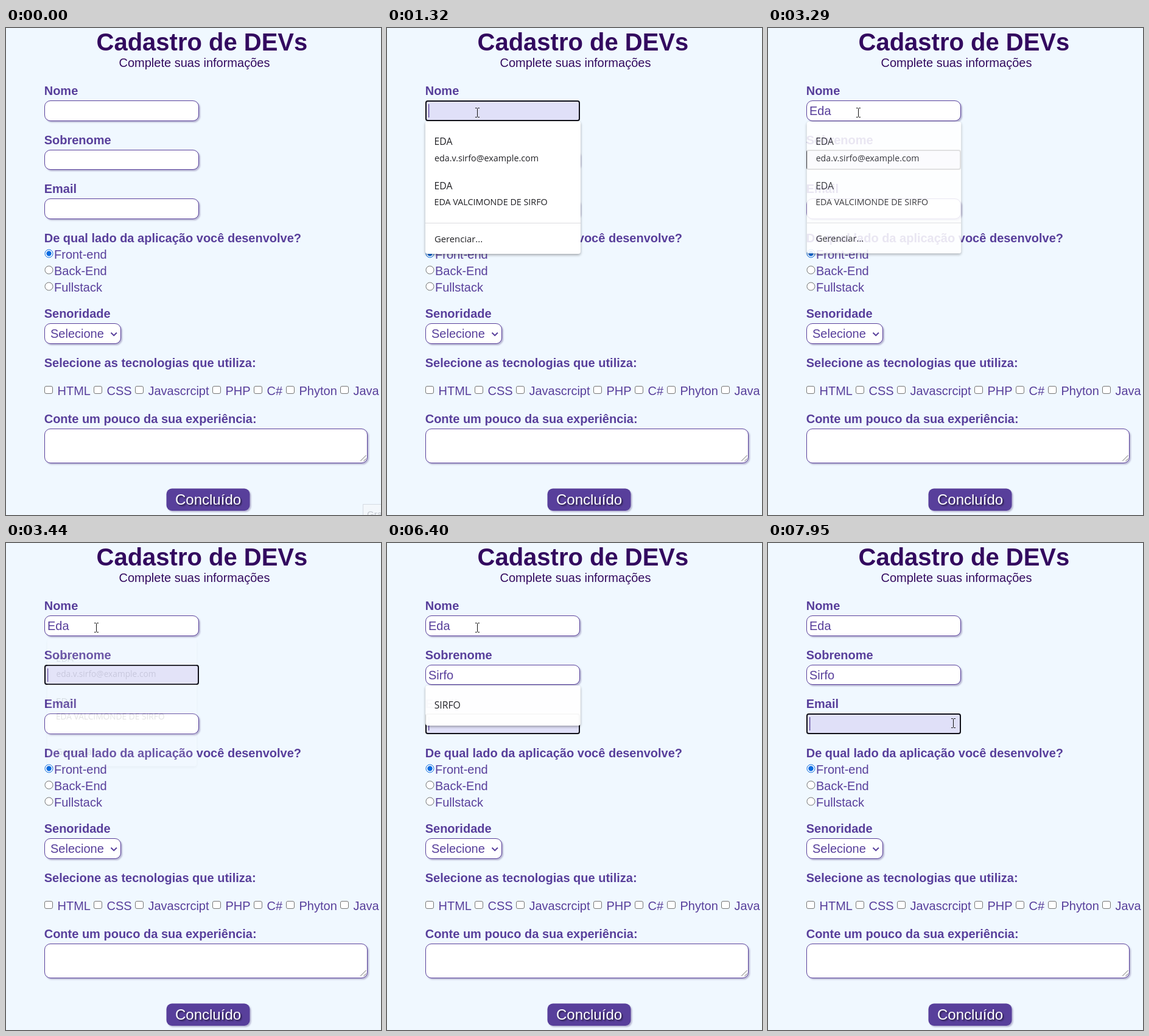
Write an HTML page that moves like this. It is 616 px wide and 800 px high and loops after 8000 ms.

```html
<!DOCTYPE html>
<html lang="pt">
<head>
<meta charset="utf-8">
<title>Cadastro de DEVs</title>
<style>
html, body { margin: 0; height: 100%; overflow: hidden; background: #f0f8ff; }
svg { display: block; width: 616px; height: 800px; font: 20px "Liberation Sans", Arial, sans-serif; fill: #583f9b; }
.dark { fill: #330a5f; }
.bold { font-weight: bold; }
.box { fill: #fff; stroke: #583f9b; filter: drop-shadow(2px 2px 1px #5a4a8a66); }
.focus { fill: #e0e0f8; stroke: #101018; stroke-width: 2; }
.tick { fill: #fff; stroke: #767676; }
.line { fill: none; stroke: #583f9b; stroke-width: 2; }
.pop { fill: #202024; font: 14.3px "Open Sans", "Noto Sans", sans-serif; }
.pop rect { fill: #fff; filter: drop-shadow(0 2px 2px #0005); }
.pop .head { font-size: 15.8px; font-weight: 500; }
</style>
</head>
<body>
<svg viewBox="0 0 616 800">
  <text class="dark bold" x="148.5" y="37" font-size="40">Cadastro de DEVs</text>
  <text class="dark" x="185.5" y="64">Complete suas informações</text>
  <g id="form"></g>
  <g id="fields"></g>

  <path class="line" d="M172.5 500.5l4.7 4.7 4.7-4.7"/>
  <path d="M582 711.5l9.5-9.5M587.5 711.5l4-4" stroke="#666"/>
  <rect x="263.5" y="756.5" width="137" height="36.5" rx="9" style="filter:drop-shadow(2px 2px 1px #5a4a8a66)"/>
  <text x="278" y="783" font-size="24" style="fill:#fff;filter:drop-shadow(2px 2px 1px #0008)">Concluído</text>

  <g id="tip">
    <rect x="586.5" y="782.5" width="40" height="30" fill="#f3f7fb" stroke="#d5dbe2"/>
    <text x="593" y="804" font-size="15" fill="#c3c8d0">Gra</text>
  </g>

  <rect id="caret" width="1.3" height="22"/>

  <g class="pop" id="popA" style="transform-origin:190.5px 262px">
    <rect x="63" y="153" width="255" height="218" rx="4"/>
    <text class="head" x="77.5" y="192">EDA</text>
    <text x="78" y="218.5">eda.v.sirfo@example.com</text>
    <text class="head" x="77.5" y="265">EDA</text>
    <text x="77.5" y="291">EDA VALCIMONDE DE SIRFO</text>
    <path d="M63 320.5h255" stroke="#dcdcdf"/>
    <text x="78" y="351.5" font-size="14.8">Gerenciar...</text>
  </g>
  <g class="pop" id="popB" style="transform-origin:190.5px 267px">
    <rect x="63" y="234" width="255" height="66" rx="4"/>
    <text class="head" x="77.5" y="272">SIRFO</text>
  </g>

  <g id="mouse">
    <path id="beam" d="M-3 -7.5h2.5l1 1 1-1h2.5M.5 -6.5v13M-3 7.5h2.5l1-1 1 1h2.5" fill="none" stroke="#111"/>
    <path id="arrow" d="M.5 .5v16l3.7-3.5 2.6 6 2.4-1-2.6-5.8h5z" fill="#fff" stroke="#111"/>
  </g>
</svg>
<script>
const $ = id => document.getElementById(id);
const clamp = v => Math.max(0, Math.min(1, v));
const show = (el, on) => { el.style.display = on ? '' : 'none'; };
const text = (x, y, s, cls = '') => `<text class="${cls}" x="${x}" y="${y}">${s}</text>`;
const box = (x, y, w, h, r = 9.5, cls = 'box') =>
  `<rect class="${cls}" x="${x}" y="${y}" width="${w}" height="${h}" rx="${r}"/>`;

// Static form
let html = '';
[['Nome', 110], ['Sobrenome', 191], ['Email', 271], ['De qual lado da aplicação você desenvolve?', 352],
 ['Senoridade', 476], ['Selecione as tecnologias que utiliza:', 557], ['Conte um pouco da sua experiência:', 649]]
  .forEach(([s, y]) => html += text(62.7, y, s, 'bold'));
['Front-end', 'Back-End', 'Fullstack'].forEach((s, i) => {
  const y = 370.5 + 27 * i;
  html += `<circle class="tick" cx="70.5" cy="${y}" r="6.5" ${i ? '' : 'style="stroke:#0a6be0"'}/>`;
  if (!i) html += `<circle cx="70.5" cy="${y}" r="4.2" fill="#0a6be0"/>`;
  html += text(79, y + 8.5, s);
});
[['HTML', 63], ['CSS', 144], ['Javascrcipt', 212], ['PHP', 339], ['C#', 407], ['Phyton', 460], ['Java', 549]]
  .forEach(([s, x]) => html += box(x + .5, 588.5, 13, 12, 2.5, 'tick') + text(x + 21.5, 603, s));
html += box(63.5, 485.5, 125, 33) + text(73, 509, 'Selecione') + box(63.5, 658.5, 530, 56);
$('form').innerHTML = html;

// Inputs: focus span, typed value, time of each key, caret spans
const inputs = [
  { y: 119.5, h: 33, focus: [1270, 3290], value: 'Eda', keys: [2320, 2680, 2780],
    caret: [[1270, 1810], [2320, 3290]] },
  { y: 200.5, h: 32, focus: [3290, 6400], value: 'Sirfo', keys: [4720, 5670, 5770, 5870, 5970],
    caret: [[3340, 3850], [4400, 5260], [5670, 6400]] },
  { y: 280.5, h: 33, focus: [6400, 8000], value: '', keys: [],
    caret: [[6400, 6950], [7470, 8000]] }
];
$('fields').innerHTML = inputs.map(f => '<g>' + box(63.5, f.y, 253, f.h) +
  box(64, f.y + .5, 252, f.h - 1, 3, 'focus') + text(68, f.y + 23.5, '') + '</g>').join('');
inputs.forEach((f, i) => [f.plain, f.lit, f.label] = $('fields').children[i].children);

const within = (t, [a, b]) => t >= a && t < b;
const step = (t, from, size = 50) => Math.floor((t - from) / size) * size;

// Suggestion list: quick fade in, then fade and shrink away
function popup(el, t, open, close, lead) {
  let o = 0, scale = 1;
  if (t >= close) {
    o = 1 - clamp((step(t, close) + lead) / 200);
    scale = .955 + .045 * o;
  } else if (t >= open) {
    o = clamp((step(t, open) + 50) / 100);
  }
  el.style.opacity = o;
  el.style.transform = `scale(${scale})`;
}

function pointer(t) {
  const ease = p => p * p * (3 - 2 * p);
  let x, y;
  if (t < 7750) {
    const p = ease(clamp((step(t, 530, 56) + 20) / 680));
    x = 601 - 453 * p;
    y = 409 - 270 * p;
  } else {
    const p = ease(clamp((step(t, 7750) + 50) / 250));
    x = 148 + 156 * p;
    y = 139 + 157 * p;
  }
  const onField = x > 63 && x < 317 && inputs.some(f => y > f.y && y < f.y + f.h);
  const onLabel = x > 63 && x < 486 && y > 334 && y < 357;
  show($('mouse'), t >= 530);
  show($('beam'), onField || onLabel);
  show($('arrow'), !onField && !onLabel);
  $('mouse').setAttribute('transform', `translate(${Math.round(x)} ${Math.round(y)})`);
}

function draw(now) {
  const t = now % 8000;
  show($('tip'), t < 50);
  show($('caret'), false);
  for (const f of inputs) {
    const lit = within(t, f.focus);
    show(f.plain, !lit);
    show(f.lit, lit);
    f.label.textContent = f.value.slice(0, f.keys.filter(k => t >= k).length);
    if (f.caret.some(c => within(t, c))) {
      const w = f.label.textContent ? f.label.getComputedTextLength() - 1 : 0;
      show($('caret'), true);
      $('caret').setAttribute('x', Math.floor(68 + w));
      $('caret').setAttribute('y', f.y + 5.5);
    }
  }
  popup($('popA'), t, 1270, 3290, 26);
  popup($('popB'), t, 4720, 6400, 6);
  pointer(t);
}

const start = performance.now();
function loop() {
  draw(performance.now() - start);
  requestAnimationFrame(loop);
}
loop();
</script>
</body>
</html>
```
